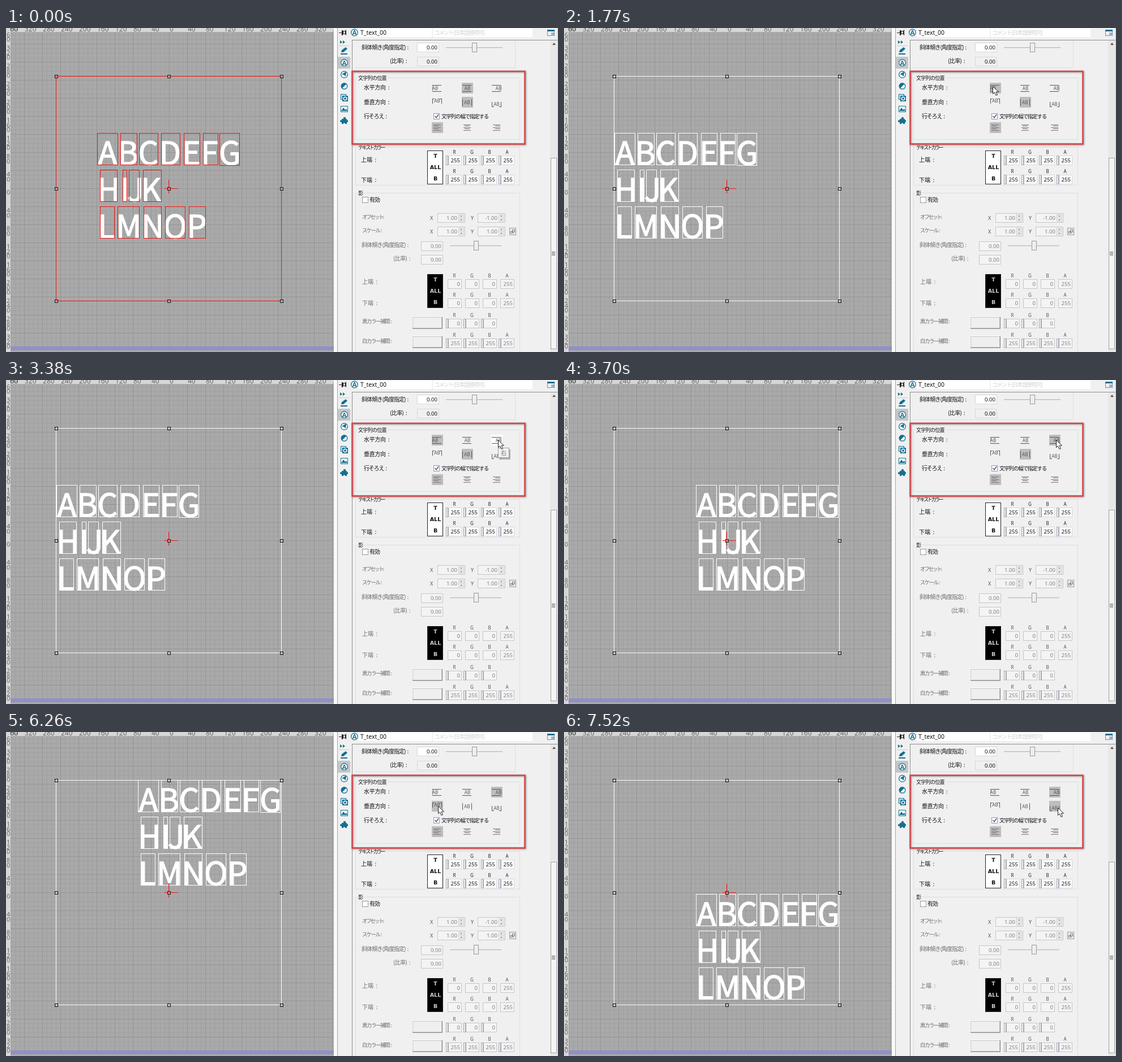
Write an HTML page with a canvas that moves like this. It is 975x574 px and loops after 8 s.

```html
<!DOCTYPE html>
<html lang="ja">
<meta charset="utf-8">
<style>
html, body { margin: 0; width: 100%; height: 100%; overflow: hidden; background: #f0f0f0 }
canvas { display: block }
</style>
<canvas id="stage" width="975" height="574"></canvas>
<script>
const g = document.getElementById('stage').getContext('2d');
const LOOP = 8000, TEAL = '#15708f', RED = '#f01414', DIM = '#6c6c6c', PRESSED = '#bdbdbd';
const UI = '"Noto Sans", "Noto Sans CJK JP", sans-serif';
const JP = '"Noto Sans CJK JP", "Noto Sans CJK", sans-serif';

// Crisp one-pixel outline when a stroke is given.
function box(x, y, w, h, fill, stroke) {
  if (fill) { g.fillStyle = fill; g.fillRect(x, y, w, h); }
  if (stroke) { g.strokeStyle = stroke; g.strokeRect(x + .5, y + .5, w - 1, h - 1); }
}
function line(color, ...p) {
  g.strokeStyle = color;
  g.beginPath();
  for (let i = 0; i < p.length; i += 2) g.lineTo(p[i], p[i + 1]);
  g.stroke();
}
function poly(fill, ...p) {
  g.fillStyle = fill;
  g.beginPath();
  for (let i = 0; i < p.length; i += 2) g.lineTo(p[i], p[i + 1]);
  g.closePath();
  g.fill();
}
function disc(x, y, r, fill, from = 0, to = 7) {
  g.fillStyle = fill;
  g.beginPath();
  g.arc(x, y, r, from, to);
  g.fill();
}
function text(s, x, y, { size = 10, color = '#111', align = 'left', track = 0, weight = '', font = UI } = {}) {
  g.font = `${weight} ${size}px ${font}`;
  g.letterSpacing = track + 'px';
  g.textAlign = align;
  g.fillStyle = color;
  g.fillText(s, x, y);
  g.letterSpacing = '0px';
}
const label = (s, x, y, track = 0, color = '#111', size = 10) => text(s, x, y, { track, color, size, font: JP });

// ---------- left: work area ----------
const rows = [
  ['ABCDEFG', [161, 36, 202, 29, 235, 33, 274, 33, 314, 28, 348, 26, 377, 35], 187],
  ['HIJK', [166, 30, 206, 7, 217, 18, 242, 32], 252],
  ['LMNOP', [166, 25, 197, 38, 243, 31, 281, 35, 323, 29], 317],
];

function workArea() {
  box(0, 0, 579, 574, '#a9a9a9');
  for (let i = -36; i <= 36; i++) {
    const color = i % 4 ? '#a0a0a0' : '#949494';
    box(288 + i * 8, 7, 1, 557, color);
    box(8, 284 + i * 8, 570, 1, color);
  }
  box(8, 564, 571, 7, '#9090c6');
  box(8, 571, 571, 3, '#a9a9a9');
  box(0, 0, 579, 7, '#d6d6d6');
  box(0, 0, 8, 574, '#d6d6d6');
  const style = { size: 12, color: '#666' };
  for (let i = -9; i <= 9; i++) {
    const n = String(Math.abs(i * 40));
    text(n, 289 + i * 32, 6, style);
    [...n].forEach((digit, k) => text(digit, 1, 295 + i * 32 + k * 8.5, { ...style, size: 11 }));
  }
  box(0, 0, 8, 7, '#d6d6d6');
  text('60', 7, 6, style);
}

function letters(dx, dy, color) {
  box(88, 85, 399, 399, null, color);
  for (const [chars, spans, y] of rows)
    [...chars].forEach((c, i) => {
      const x = spans[i * 2] + dx, w = spans[i * 2 + 1];
      g.font = `56px ${JP}`;
      g.textAlign = 'left';
      const m = g.measureText(c);
      const left = x + (w + 1 + m.actualBoundingBoxLeft - m.actualBoundingBoxRight) / 2;
      g.fillStyle = g.strokeStyle = '#fff';
      g.lineWidth = 1.3;
      g.fillText(c, left, y + dy + 54.6);
      g.strokeText(c, left, y + dy + 54.6);
      g.lineWidth = 1;
      box(x, y + dy - 1, w + 1, c === 'G' ? 58 : 57, null, color);
    });
  box(280, 284, 24, 1, RED);
  box(287, 269, 1, 24, RED);
  for (const x of [88, 287, 486])
    for (const y of [85, 284, 483]) {
      box(x - 2, y - 2, 6, 6, null, '#111');
      box(x - 1, y - 1, 4, 4, null, '#bbb');
    }
}

// ---------- right: property panel ----------
function group(y, bottom, title, w, track, x2 = 908) {
  box(617, y, x2 - 617, bottom - y, null, '#dedede');
  box(620, y - 5, w, 10, '#f0f0f0');
  label(title, 622, y + 4, track, '#111', 9);
}
function field(x, y, w, value, { on = true, strip = false, bg = on ? '#fff' : '#f4f4f4' } = {}) {
  box(x, y, w, 17, bg, on ? '#d4d8de' : '#c6c6c6');
  if (strip) {
    box(x, y, 4, 17, '#f0f0f0', '#a4abb8');
    box(x + 4, y + 1, 1, 15, '#aaa');
  }
  text(value, x + w - 3, y + 12, { size: 9.6, align: 'right', color: on ? '#111' : '#808080' });
}
function spin(x, y, value) {
  field(x, y, 49, '', { on: false });
  text(value, x + 35, y + 12, { size: 9.6, align: 'right', color: '#808080' });
  box(x + 37, y + 2, 10, 7, '#eee', '#d0d0d0');
  box(x + 37, y + 8, 10, 7, '#eee', '#d0d0d0');
  poly('#777', x + 40, y + 6, x + 44, y + 6, x + 42, y + 4);
  poly('#777', x + 40, y + 11, x + 44, y + 11, x + 42, y + 13);
}
function slider(x, x2, y, knob) {
  box(x, y, x2 - x, 2, '#dedede');
  box(x, y, x2 - x, 1, '#bcbcbc');
  box(knob, y - 8, 9, 17, '#eee', '#999');
}
function channels(y, values, names, opt) {
  values.forEach((v, i) => {
    const x = 777 + i * 31;
    text(names[i], x + 15, y - 3, { size: 8, align: 'center', color: opt.on ? '#222' : '#555' });
    opt.strip ? field(x, y, 28, v, opt) : field(x + 3, y, 25, v, opt);
  });
}
function preview(y, bg, fg) {
  box(744, y, 28, 60, bg, '#222');
  ['T', 'ALL', 'B'].forEach((s, i) =>
    text(s, 758.5, y + 13 + i * 20, { size: 9.5, weight: 'bold', align: 'center', color: fg, font: '"DejaVu Sans", sans-serif' }));
}
function badge(x, y, r) {
  disc(x, y, r, TEAL);
  disc(x, y, r - 1.3, '#fff');
  text('A', x, y + 4, { size: 11, weight: 'bold', align: 'center', color: TEAL });
}

function toolIcons() {
  box(586, 51, 22, 21, '#c6c6c6');
  for (const x of [590, 595]) poly(TEAL, x, 22, x + 4, 25, x, 28);
  box(588, 31, 19, 1, '#ccc');
  poly(TEAL, 592, 43, 593, 39, 600, 34, 603, 37, 596, 43);
  box(591, 45, 12, 2, TEAL);
  badge(597.5, 61.5, 6.5);
  disc(597.5, 82.5, 6.5, TEAL);
  disc(597.5, 82.5, 5.2, '#fff');
  poly(TEAL, 593, 82, 601, 77, 600, 86, 597, 83);
  disc(597.5, 103, 6, TEAL);
  disc(597.5, 103, 4.6, '#fff', -.8, 2.35);
  box(591, 117, 10, 10, '#cfe4ec', TEAL);
  box(594, 120, 10, 10, TEAL);
  disc(599, 125, 3.5, '#fff');
  disc(599, 125, 2, TEAL);
  box(591, 138, 13, 11, '#fff', TEAL);
  poly(TEAL, 592, 147, 596, 141, 599, 145, 601, 143, 603, 147);
  box(593, 161, 9, 9, TEAL);
  disc(598, 160, 2.2, TEAL);
  disc(602, 165, 2.2, TEAL);
  disc(592, 165, 2, TEAL);
  disc(597.5, 170, 1.8, '#f0f0f0');
}

function header() {
  box(579, 0, 396, 574, '#f0f0f0');
  box(579, 0, 6, 574, '#fafafa');
  box(585, 0, 1, 574, '#a5a5a5');
  box(611, 21, 364, 1, '#8d8d8d');
  box(588, 8, 5, 1, '#222');
  box(593, 4, 2, 9, '#222');
  box(595, 5, 5, 6, '#ddd', '#222');
  box(600, 3, 1, 10, '#222');
  badge(615.5, 8, 6.5);
  box(622, 1, 130, 15, '#fff');
  box(754, 1, 176, 15, '#fff');
  text('T_text_00', 626, 12, { size: 10.5 });
  label('コメント(日本語使用可)', 756, 12, -1.5, '#d2d2d2');
  box(956, 3, 13, 11, '#e8f0f4', '#7690a0');
  box(956, 3, 13, 3, TEAL);
  box(963, 8, 5, 6, '#96b9ca');
  box(611, 21, 1, 553, '#8d8d8d');
}

function scrollbar() {
  box(961, 22, 13, 552, '#e8e8e8');
  poly('#555', 965, 30, 971, 30, 968, 26);
  box(962, 230, 11, 339, '#f4f4f4', '#a4a4a4');
  for (const y of [396, 398, 400, 402]) box(964, y, 6, 1, '#777');
  box(974, 0, 1, 574, '#ccc');
}

function panel() {
  header();
  toolIcons();
  scrollbar();

  box(617, 70, 283, 1, '#dedede');
  box(899, 22, 1, 49, '#dedede');
  label('斜体傾き(角度指定)  :', 628, 38, -.9);
  field(726, 26, 39, '0.00');
  slider(777, 877, 34, 823);
  label('(比率)  :', 678, 62, -.6);
  field(726, 51, 39, '0.00', { bg: '#f0f0f0' });

  group(88, 198, '文字列の位置', 54, -.7);
  label('水平方向  :', 632, 109, -.3);
  label('垂直方向  :', 632, 135, -.3);
  label('行そろえ   :', 632, 160, -1.2);
  box(755, 151, 11, 11, '#fff', '#999');
  g.lineWidth = 1.5;
  line('#4a5c94', 757.5, 156, 760, 159, 764, 153);
  g.lineWidth = 1;
  label('文字列の幅で指定する', 769, 160, -1.2, '#111', 9.5);

  group(211, 279, 'テキストカラー', 50, -2.4);
  label('上端  :', 627, 237);
  label('下端  :', 627, 273);
  preview(217, '#fff', '#111');
  const white = [255, 255, 255, 255], black = [0, 0, 0, 255], active = { on: true, strip: true };
  channels(226, white, 'RGBA', active);
  channels(260, white, 'RGBA', active);

  group(292, 590, '影', 11, 0);
  box(629, 299, 11, 11, '#fff', '#999');
  label('有効', 642, 308, -1);
  label('オフセット     :', 629, 338, -2.2, DIM, 9.5);
  label('スケール    :', 629, 362, -1.7, DIM, 9.5);
  for (const [y, a, b] of [[328, '1.00', '-1.00'], [352, '1.00', '1.00']]) {
    text('X', 749, y + 12, { size: 9, color: '#555' });
    text('Y', 821, y + 12, { size: 9, color: '#555' });
    spin(762, y, a);
    spin(833, y, b);
  }
  box(889, 354, 12, 13, '#eee', '#999');
  box(891, 360, 5, 4, null, '#777');
  box(894, 357, 5, 5, null, '#777');
  label('斜体傾き(角度指定)  :', 628, 388, -.9, DIM);
  field(733, 378, 39, '0.00', { on: false });
  slider(784, 875, 385, 826);
  label('(比率)  :', 684, 412, -.6, DIM);
  field(733, 402, 39, '0.00', { on: false });

  label('上端  :', 629, 453, 0, DIM);
  label('下端  :', 629, 491, 0, DIM);
  preview(436, '#000', '#ccc');
  const off = { on: false }, offStrip = { on: false, strip: true };
  channels(445, black, 'RGBA', off);
  channels(479, black, 'RGBA', off);
  label('黒カラー補間   :', 629, 523, -1.5, DIM, 9.5);
  label('白カラー補間   :', 629, 558, -1.5, DIM, 9.5);
  for (const y of [512, 546]) {
    box(718, y, 53, 21, '#888');
    box(717, y - 1, 53, 21, '#fff');
    box(718, y, 52, 20, '#efefef', '#c4c4c4');
  }
  channels(515, [0, 0, 0], 'RGB', offStrip);
  channels(550, white, 'RGBA', offStrip);

  g.save();
  g.shadowColor = 'rgba(40,60,80,.55)';
  g.shadowBlur = 3;
  g.shadowOffsetX = g.shadowOffsetY = 1;
  g.lineWidth = 2.5;
  g.strokeStyle = '#dd4141';
  g.strokeRect(611.5, 76.8, 305, 128.7);
  g.restore();
}

// ---------- position buttons ----------
const colX = [752, 805, 857], rowY = [97, 122];

function positionIcon(row, col, x, y) {
  const ink = '#555';
  if (row === 0) {
    text('AB', x + [6, 10, 13][col], y + 13, { size: 8, align: 'center', color: ink });
    box(x + 1, y + 4, 16, 1, ink);
    box(x + 1, y + 15, 16, 1, ink);
    if (col !== 1) for (let i = 5; i < 15; i += 2) box(x + (col ? 17 : 1), y + i, 1, 1, ink);
  } else {
    text('AB', x + 9.5, y + [10, 13, 16][col], { size: 8, align: 'center', color: ink });
    const top = [3, 4, 9][col];
    box(x + 1, y + top, 1, col === 1 ? 12 : 9, ink);
    box(x + 17, y + top, 1, col === 1 ? 12 : 9, ink);
    if (col !== 1) for (const dx of [1, 14]) box(x + dx, y + (col ? 17 : 3), 4, 1, ink);
  }
}

function buttons(selected, isHover) {
  rowY.forEach((y, row) => colX.forEach((x, col) => {
    const fill = selected[row] === col ? PRESSED : isHover(x, y) ? '#fff' : null;
    box(x, y, 20, 19, fill);
    positionIcon(row, col, x, y);
  }));
  box(752, 167, 20, 19, PRESSED);
  colX.forEach((x, col) => {
    for (let i = 0; i < 5; i++) {
      const w = i % 2 ? 9 : 13;
      box(x + 3 + (13 - w) * col / 2, 171 + i * 2.5 | 0, w, 1, '#777');
    }
  });
}

// ---------- pointer ----------
const path = [
  [380, 911, 566], [1150, 818, 242], [1220, 768, 120], [1300, 757, 103],
  [2300, 757, 103], [2530, 796, 105], [3000, 869, 106],
  [4480, 869, 106], [4950, 760, 130], [6180, 760, 130], [6260, 763, 131],
  [6650, 872, 134], [LOOP, 872, 134],
];
const STEP = 77;   // the pointer moves in steps of this many ms

function pointerAt(t) {
  const i = path.findIndex(p => p[0] > t) - 1;
  if (i < 0) return null;
  const [t0, x0, y0] = path[i], [t1, x1, y1] = path[i + 1];
  const f = Math.floor((t - t0) / STEP) * STEP / (t1 - t0);
  return [Math.round(x0 + (x1 - x0) * f), Math.round(y0 + (y1 - y0) * f)];
}
function pointer([x, y]) {
  g.save();
  g.translate(x + .5, y + .5);
  poly('#fff', 0, 0, 0, 13, 3, 10.3, 5.5, 16, 8, 15, 5.6, 9.5, 10, 9.5);
  g.strokeStyle = '#222';
  g.stroke();
  g.restore();
}

const tips = [[2300, 2610, 757, 117, '左'], [3380, 3540, 869, 120, '右'], [7130, 7280, 873, 149, '下']];

function tooltip(x, y, s) {
  g.globalAlpha = .85;
  box(x + 3, y + 3, 19, 18, '#aaa');
  box(x, y, 20, 18, '#fafafa', '#888');
  label(s, x + 5, y + 13, 0, '#666');
  g.globalAlpha = 1;
}

// ---------- timeline ----------
function draw(t) {
  const col = t < 1690 ? 1 : t < 3700 ? 0 : 2;
  const row = t < 5480 ? 1 : t < 7440 ? 0 : 2;
  const at = pointerAt(t);
  // The first highlight shows just before the pointer arrives.
  const aim = t >= 1150 && t < 1300 ? [757, 103] : at;
  const isHover = (x, y) => aim && aim[0] >= x && aim[0] < x + 20 && aim[1] >= y && aim[1] < y + 19;
  workArea();
  letters((col - 1) * 72, (row - 1) * 101, t < 1690 ? RED : '#fff');
  panel();
  buttons([col, row], isHover);
  for (const [from, to, x, y, s] of tips) if (t >= from && t < to) tooltip(x, y, s);
  if (at) pointer(at);
}

const start = performance.now();
(function frame() {
  draw((performance.now() - start) % LOOP);
  requestAnimationFrame(frame);
})();
</script>
</html>
```
